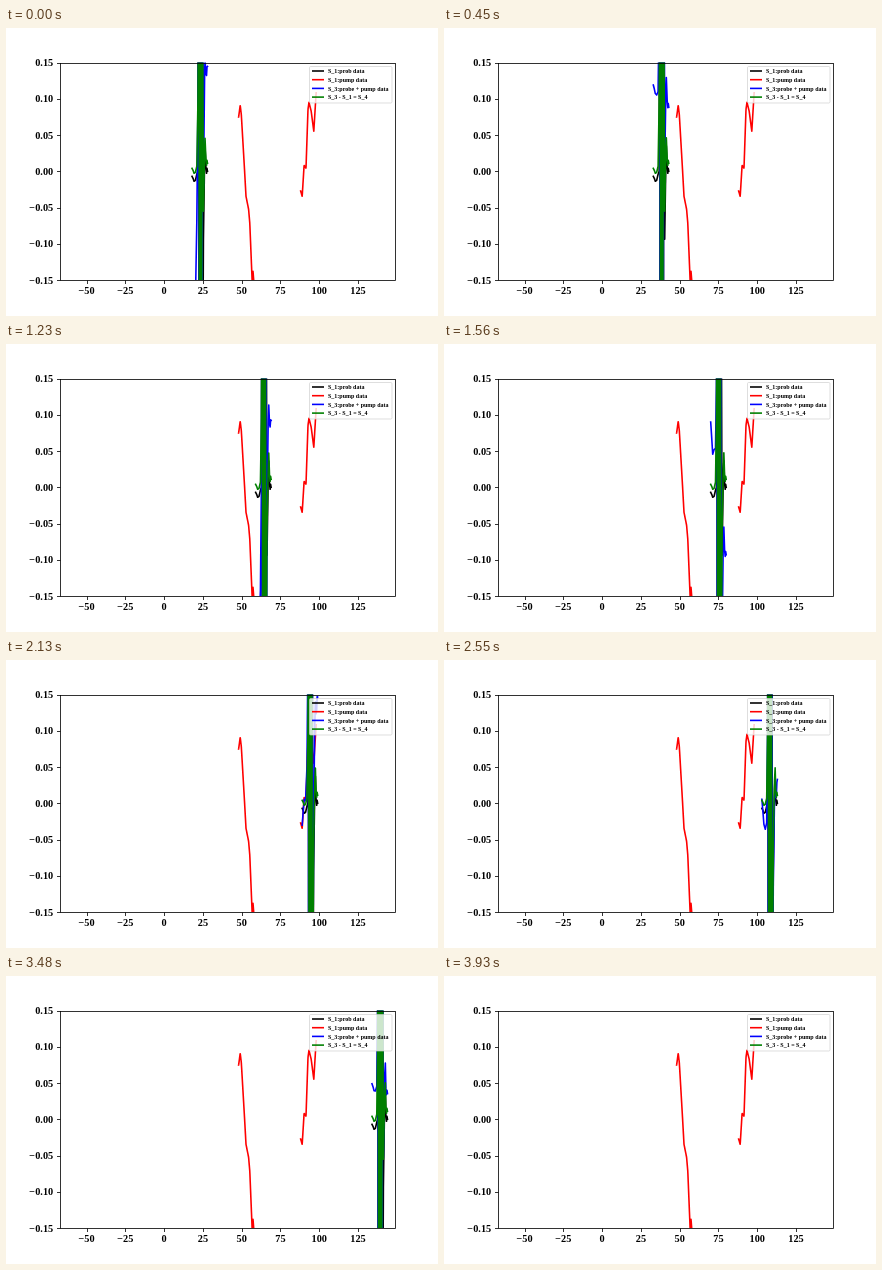
Recreate the animation shown at these times as an HTML page. Size 432 px wide and 288 px high, loop 4520 ms.

```html
<!DOCTYPE html>
<html lang="en">
<head>
<meta charset="utf-8">
<title>Pulse sweep</title>
<style>
html, body { margin: 0; width: 100%; height: 100%; overflow: hidden; background: #fff; }
svg { display: block; width: 432px; height: 288px; }
text { font: bold 10.3px "Liberation Serif", "Times New Roman", serif; }
.legend text { font-size: 6px; }
.curve { fill: none; stroke-width: 1.6; stroke-linejoin: round; stroke-linecap: square; }
.axis { fill: none; stroke: #000; stroke-width: .8; }
</style>
</head>
<body>
<svg viewBox="0 0 432 288">
  <defs><clipPath id="area"><rect x="54" y="34.6" width="334.8" height="217.4"/></clipPath></defs>
  <g id="curves" clip-path="url(#area)"></g>
  <path id="ticks" class="axis"/>
  <rect class="axis" x="54.5" y="35.5" width="335" height="217"/>
  <g id="labels"></g>
  <g id="legend" class="legend">
    <rect x="303.5" y="38.5" width="82.5" height="36.5" rx="1.2" fill="#fff" fill-opacity=".8" stroke="#ccc" stroke-opacity=".8" stroke-width=".8"/>
  </g>
</svg>
<script>
const LOOP = 4520, STEP = 30, LAST = 131;
const ZERO_X = 158.1, UNIT = 1.5514, ZERO_Y = 143.3;
const COLORS = { probe: '#000', pump: '#f00', sum: '#00f', diff: '#008000' };
const $ = id => document.getElementById(id);
const px = v => ZERO_X + v * UNIT;

function add(parent, tag, attrs, text) {
  const el = document.createElementNS('http://www.w3.org/2000/svg', tag);
  for (const name in attrs) el.setAttribute(name, attrs[name]);
  if (text) el.textContent = text;
  return parent.appendChild(el);
}

// Pump signal: x in pixels, offset from the zero line
const pump = [
  [188, 150], [190, 120], [191, 40], [193, 0], [197, -30], [198.5, -75], [201.5, -97],
  [231, -45], [232, -60], [232.6, -54], [234.2, -66], [235.3, -57], [238.5, -2], [240, 25],
  [242.6, 38], [243.8, 52], [246.2, 111], [247, 100], [247.8, 110], [253, 140], [261, -40],
  [266.5, -65], [269, -31], [271, -45], [277.5, 100], [279.2, 74], [283, 76], [294.4, 19],
  [296.2, 25], [298.1, -6], [300, -3], [302, -62], [303, -69], [305.2, -60], [307.8, -40],
  [311.5, -101], [317.5, -5], [320.5, 25], [322, 25], [331, 18], [333.3, -16], [347, -4],
  [349.5, 54], [351.5, 54], [358, 0], [362.5, -36], [410, 10]
];

function pumpAt(x) {
  const i = Math.max(1, pump.findIndex(p => p[0] >= x));
  const [x0, y0] = pump[i - 1], [x1, y1] = pump[i];
  return y0 + (y1 - y0) * (x - x0) / (x1 - x0);
}

function burst(from, to) {
  const pts = [];
  for (let x = from, up = true; x <= to; x += .4, up = !up) pts.push([x, up ? -300 : 300]);
  return pts;
}

// Pulse shape from its start; k grows along the sweep, wide stretches the burst
const pulse = (k, wide, spike, drop) => [
  [0, -3], [1, -1], [2, 2], [3.4, 1], [4.8, -5], [5.9 - .3 * k, spike],
  ...burst(6.9 - .8 * k - wide, 10.2 + .2 * k + wide),
  [11.4, drop], [12.6, -22], [13 + .4 * k, -33 - 4 * k],
  [13.9, -12], [14.5, -6], [15, -11], [15.5, -8]
];

const toPoints = pts => pts.map(([x, y]) => x.toFixed(2) + ',' + (ZERO_Y + y).toFixed(2)).join(' ');
const curve = color => add($('curves'), 'polyline', { class: 'curve', stroke: color });

for (const start of [48, 88]) {
  const pts = [];
  for (let v = start; v <= start + 10; v += .1) pts.push([px(v), pumpAt(px(v))]);
  curve(COLORS.pump).setAttribute('points', toPoints(pts));
}
const probe = curve(COLORS.probe), sum = curve(COLORS.sum), diff = curve(COLORS.diff);

// Axes
let ticks = '';
const sign = (v, digits) => (v < 0 ? '\u2212' : '') + Math.abs(v).toFixed(digits);
for (let v = -50; v <= 125; v += 25) {
  ticks += `M${Math.round(px(v)) + .5} 252.5v3.5`;
  add($('labels'), 'text', { x: px(v), y: 266, 'text-anchor': 'middle' }, sign(v, 0));
}
for (let i = -3; i <= 3; i++) {
  const y = ZERO_Y - i * 36.24;
  ticks += `M54.5 ${Math.round(y) + .5}h-3.5`;
  add($('labels'), 'text', { x: 47.2, y: y + 3.6, 'text-anchor': 'end' }, sign(i * .05, 2));
}
$('ticks').setAttribute('d', ticks);

// Legend
[['S_1:prob data', COLORS.probe], ['S_1:pump data', COLORS.pump],
 ['S_3:probe + pump data', COLORS.sum], ['S_3 - S_1 = S_4', COLORS.diff]
].forEach(([name, color], i) => {
  const y = 43 + i * 8.7;
  add($('legend'), 'path', { d: `M306 ${y}h12`, stroke: color, 'stroke-width': 1.6 });
  add($('legend'), 'text', { x: 322, y: y + 2.1 }, name);
});

function draw(now) {
  const step = Math.min(LAST, Math.floor(now % LOOP / STEP));
  const start = px(18 + step), k = step / LAST;
  const show = (line, pts, lift) => line.setAttribute('points',
    toPoints(pts.map(([x, y]) => [start + x, y + lift(start + x)])));
  show(probe, pulse(k, .3, -8, 60), () => 8);
  show(sum, pulse(k, .4, -90, 60), pumpAt);
  show(diff, pulse(k, 0, -70, 40), () => 0);
  // The finished sweep leaves only the pump curve
  for (const line of [probe, sum, diff]) line.style.display = step < LAST ? '' : 'none';
}

const began = performance.now();
function tick() {
  draw(performance.now() - began);
  requestAnimationFrame(tick);
}
tick();
</script>
</body>
</html>
```
